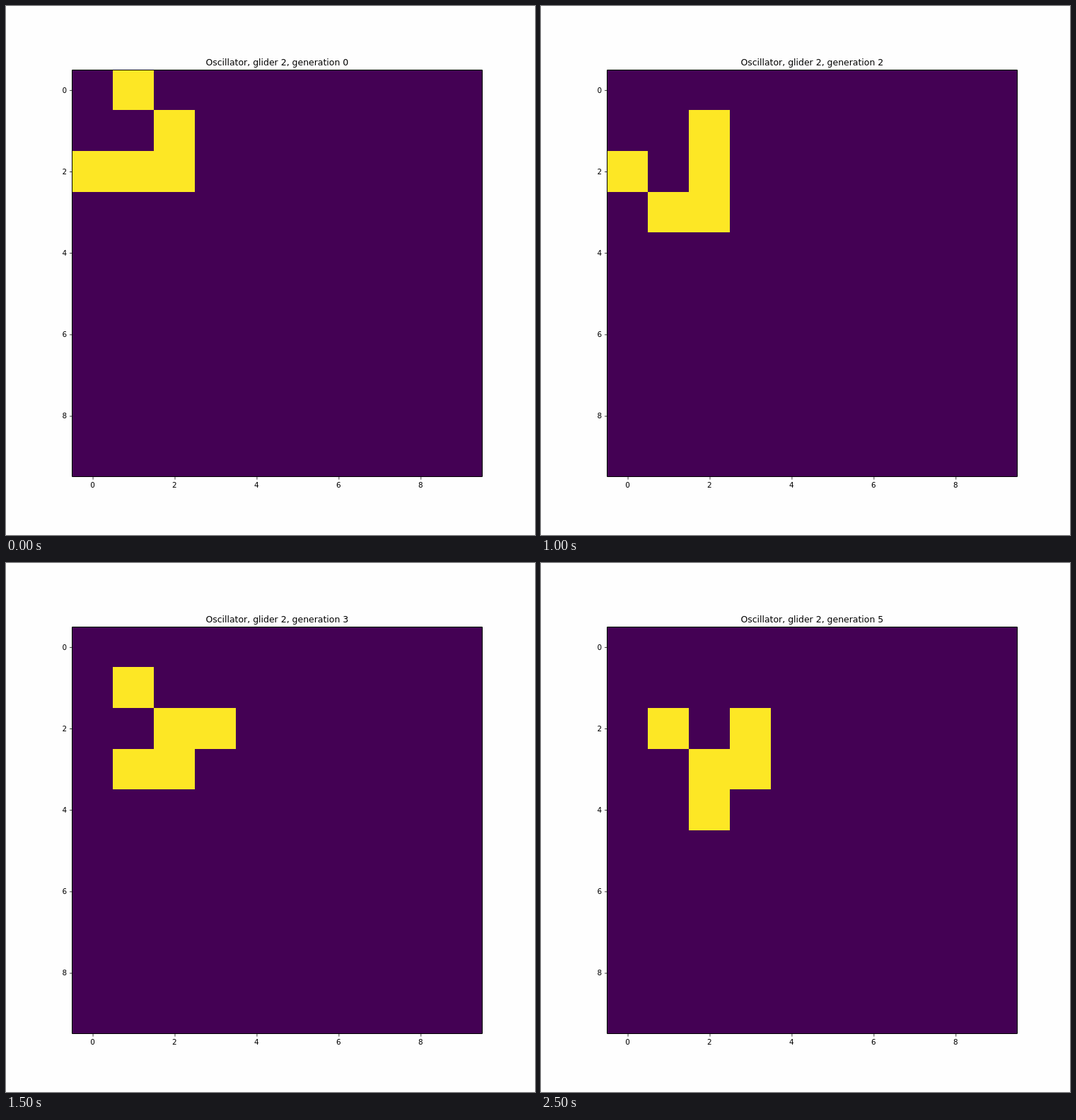
Recreate the animation shown at these times as an HTML page. Size 748 by 748 pixels, loop 3 s.

```html
<!DOCTYPE html>
<html lang="en">
<head>
<meta charset="utf-8">
<title>Glider</title>
<style>
  html, body { margin: 0; width: 100%; height: 100%; overflow: hidden; background: #fefefe; }
  svg { display: block; width: 748px; height: 748px; }
  text { font: 10.39px "DejaVu Sans", sans-serif; fill: #000; text-anchor: middle; }
  #title { font-size: 12.47px; }
</style>
</head>
<body>
<svg viewBox="0 0 748 748">
  <rect width="748" height="748" fill="#fefefe"/>
  <rect x="94" y="90" width="579" height="576" fill="#440154"/>
  <path id="cells" fill="#fde725" shape-rendering="crispEdges"/>
  <path d="M93.5 90.5H673.5V665.5H93.5Z" fill="none" stroke="#000"/>
  <g id="axes"></g>
  <text id="title" x="383.35" y="83.5"></text>
</svg>
<script>
const SIZE = 10, STEP = 500, COUNT = 6;
const LEFT = 93.5, TOP = 89.76, CELL_W = 57.97, CELL_H = 57.596;
const cells = document.getElementById('cells');
const axes = document.getElementById('axes');
const title = document.getElementById('title');

const colX = c => Math.round(LEFT + c * CELL_W);
const rowY = r => Math.round(TOP + r * CELL_H);

function add(tag, attrs, text = '') {
  const el = document.createElementNS('http://www.w3.org/2000/svg', tag);
  for (const key in attrs) el.setAttribute(key, attrs[key]);
  el.textContent = text;
  axes.append(el);
}

function drawAxes() {
  for (let n = 0; n < SIZE; n += 2) {
    const x = LEFT + (n + 0.5) * CELL_W;
    const y = TOP + (n + 0.5) * CELL_H;
    add('rect', { x: x + 0.19, y: 666, width: 0.75, height: 3.6 });
    add('rect', { x: 90, y: y + 0.37, width: 3.6, height: 0.75 });
    add('text', { x, y: 681.4 }, n);
    add('text', { x: 82.9, y: y + 4 }, n);
  }
}

// One step of the Game of Life on a bounded board
function evolve(grid) {
  const alive = (r, c) => grid[r]?.[c] || 0;
  return grid.map((row, r) => row.map((cell, c) => {
    let sum = -cell;
    for (let dr = -1; dr <= 1; dr++)
      for (let dc = -1; dc <= 1; dc++) sum += alive(r + dr, c + dc);
    return +(sum === 3 || (cell && sum === 2));
  }));
}

function gridPath(grid) {
  let d = '';
  grid.forEach((row, r) => row.forEach((cell, c) => {
    if (cell) d += `M${colX(c)} ${rowY(r)}H${colX(c + 1)}V${rowY(r + 1)}H${colX(c)}Z`;
  }));
  return d;
}

let grid = Array.from({ length: SIZE }, () => Array(SIZE).fill(0));
for (const [r, c] of [[0, 1], [1, 2], [2, 0], [2, 1], [2, 2]]) grid[r][c] = 1;

const paths = [];
for (let i = 0; i < COUNT; i++) {
  paths.push(gridPath(grid));
  grid = evolve(grid);
}

let shown = -1;
function render(time) {
  const gen = Math.floor(time / STEP) % COUNT;
  if (gen === shown) return;
  shown = gen;
  cells.setAttribute('d', paths[gen]);
  title.textContent = `Oscillator, glider 2, generation ${gen}`;
}

function tick() {
  render(performance.now());
  requestAnimationFrame(tick);
}

drawAxes();
tick();
</script>
</body>
</html>
```
